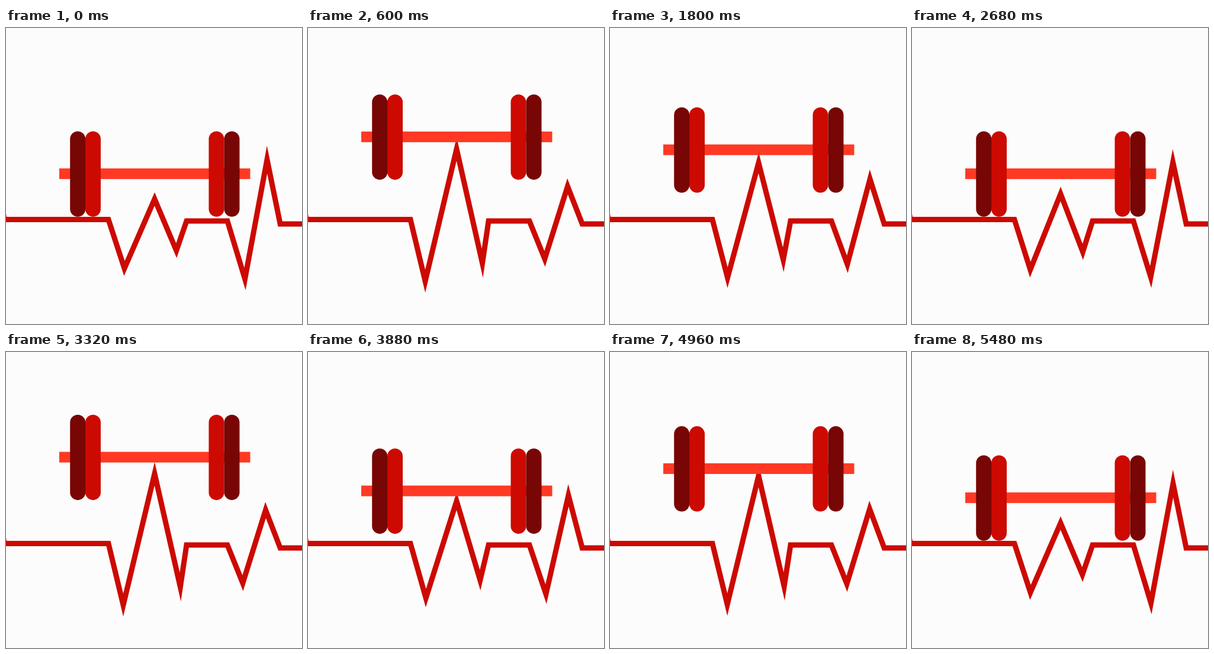
Recreate the animation shown at these times as an HTML page. Size 500 by 500 pixels, loop 5720 ms.

```html
<!DOCTYPE html>
<html lang="en">
<head>
<meta charset="utf-8">
<title>Barbell on a pulse</title>
<style>
  html, body { margin: 0; width: 100%; height: 100%; overflow: hidden; background: #fcfcfc; }
  svg { display: block; width: 100%; height: 100%; }
</style>
</head>
<body>
<svg viewBox="0 0 500 500">
  <defs>
    <rect id="plate" y="174.5" width="26" height="144.2" rx="13"/>
  </defs>
  <polyline id="pulse" fill="none" stroke="#cc0a02" stroke-width="9" stroke-miterlimit="20"/>
  <g id="barbell">
    <rect x="90" y="237.2" width="322.5" height="18" fill="#ff3924"/>
    <g fill="#cc0a02">
      <use href="#plate" x="134"/>
      <use href="#plate" x="342.5"/>
    </g>
    <g fill="#780604">
      <use href="#plate" x="108.2"/>
      <use href="#plate" x="368.5"/>
    </g>
  </g>
</svg>
<script>
// Times are counted in steps of 40 ms.
const STEP = 40, LOOP = 5720;
const BEAT = 34.1, BEAT_TOP = 17.4, BEATS = 4;
const BOUNCE = 33.5, LIFT_START = 5, LIFT_TOP = 18, LIFT_END = 32, LIFT_HEIGHT = 81;

const pulse = document.getElementById('pulse');
const barbell = document.getElementById('barbell');

// 0 at rest, 1 at the top: an even rise, then a fall that gathers speed.
function beatAt(step) {
  const t = Math.min(step, BEATS * BEAT) % BEAT;
  return t < BEAT_TOP
    ? t / BEAT_TOP
    : 1 - ((t - BEAT_TOP) / (BEAT - BEAT_TOP)) ** 1.25;
}

function liftAt(step) {
  const t = step % BOUNCE;
  const rise = (t - LIFT_START) / (LIFT_TOP - LIFT_START);
  const fall = (LIFT_END - t) / (LIFT_END - LIFT_TOP);
  return LIFT_HEIGHT * Math.max(0, Math.min(rise, fall));
}

function pulsePoints(beat) {
  const swing = (x, y, dx, dy) => [x + dx * beat, y + dy * beat];
  return [
    [-24, 222], [-2.6, 323.5], [173, 323.5],
    swing(200, 406, -2.3, 25.1),
    swing(251, 289, 0, -98),
    swing(287.8, 376, 7.8, 24.5),
    [305, 326], [374, 326],
    swing(403.6, 424, -4.3, -39.6),
    swing(441, 222.3, -2.9, 52.5),
    [463.2, 331], [510, 331]
  ];
}

function draw(ms) {
  const step = Math.floor(ms % LOOP / STEP);
  pulse.setAttribute('points', pulsePoints(beatAt(step)).join(' '));
  barbell.setAttribute('transform', `translate(0 ${-liftAt(step)})`);
}

const start = performance.now();
function tick() {
  draw(performance.now() - start);
  requestAnimationFrame(tick);
}
tick();
</script>
</body>
</html>
```
